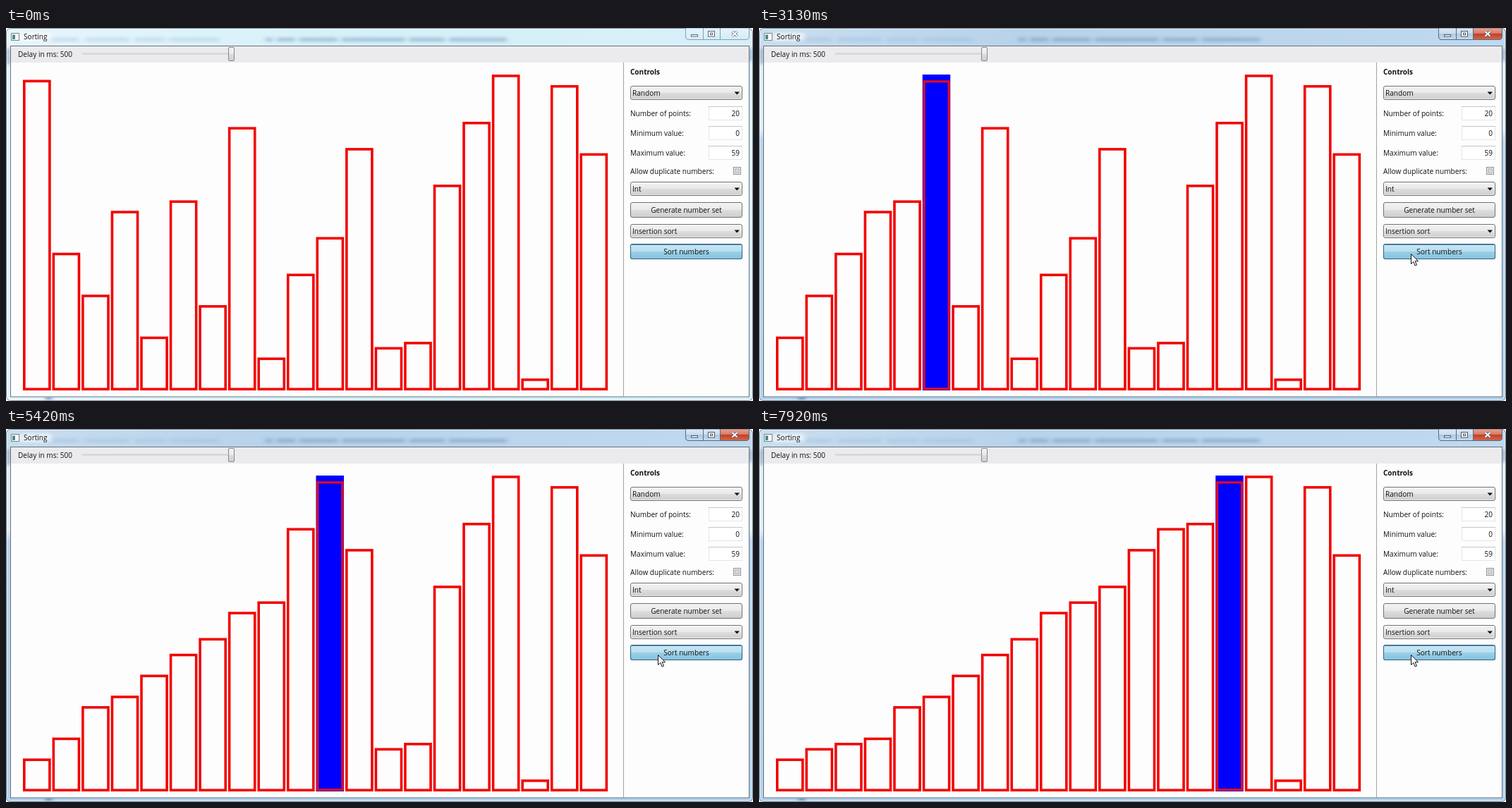
Animation, 1059 px wide and 529 px high, one loop 8000 ms. Source, as an HTML page:

```html
<!DOCTYPE html>
<html lang="en">
<head>
<meta charset="utf-8">
<title>Sorting</title>
<style>
  html, body { margin: 0; width: 100%; height: 100%; overflow: hidden; background: #fff; }
  svg { display: block; width: 1059px; height: 529px; }
  text { font: 10.1px "Open Sans", "Noto Sans", sans-serif; fill: #111; white-space: pre; }
  .bold { font-weight: bold; font-size: 10px; }
  .mid { text-anchor: middle; }
  .end { text-anchor: end; }
</style>
</head>
<body>
<svg id="stage" viewBox="0 0 1059 529"></svg>
<script>
const LOOP = 8000;
const VALUES = [58, 25, 17, 33, 9, 35, 15, 49, 5, 21, 28, 45, 7, 8, 38, 50, 59, 1, 57, 44];
const stage = document.getElementById('stage');
const get = id => document.getElementById(id);

// Markup helpers
const rect = (x, y, w, h, fill, more = '') =>
  `<rect x="${x}" y="${y}" width="${w}" height="${h}" fill="${fill}" ${more}/>`;
const path = (d, more) => `<path d="${d}" ${more}/>`;
const text = (x, y, s, cls = '') => `<text x="${x}" y="${y}" class="${cls}">${s}</text>`;
const gradient = (id, stops, dir = 'x2="0" y2="1"') =>
  `<linearGradient id="${id}" ${dir}>` +
  stops.map(([at, c]) => `<stop offset="${at}" stop-color="${c}"/>`).join('') +
  '</linearGradient>';

const box = (y, h, fill = 'url(#grey)', line = '#707070', more = '') =>
  rect(885.5, y + .5, 158, h - 1, fill, `rx="2.5" stroke="${line}" ${more}`);
const combo = (y, label) => box(y, 20) +
  rect(886.5, y + 1.5, 156, 17, 'none', 'rx="2" stroke="#fff" stroke-opacity=".6"') +
  text(888, y + 14, label) + path(`M1032.5 ${y + 8.5}h7.5l-3.75 4z`, 'fill="#111"');
const field = (y, label, value) => text(885, y + 14, label) +
  rect(996.5, y + .5, 47, 19, '#fff', 'stroke="#e2e5ea"') +
  path(`M996 ${y + .5}h48`, 'stroke="#c4c6cb"') + text(1040, y + 14, value, 'end');

const titleButtons = (fill, closeFill, line, glyph, closeGlyph) =>
  path('M963.5 0V12q0 4.5 4.5 4.5H1012.500V0z', `fill="${fill}" stroke="${line}"`) +
  path('M1012.500 0V16.500H1049q4.500 0 4.500-4.500V0z', `fill="${closeFill}" stroke="${line}"`) +
  path('M988.500 0V16', `stroke="${line}"`) +
  rect(971.5, 9.5, 9, 2.5, '#fff', `stroke="${glyph}"`) +
  rect(995.5, 4.5, 9, 7.500, '#fff', `stroke="${glyph}"`) +
  rect(998.5, 7, 3, 2.500, 'none', `stroke="${glyph}"`) +
  path('M1029.500 5l7 6.500m0-6.500l-7 6.500', `stroke="${glyph}" stroke-width="3.600"`) +
  path('M1029.500 5l7 6.500m0-6.500l-7 6.500', `stroke="${closeGlyph}" stroke-width="2"`);

const blurs = [[58, 45], [112, 62], [182, 44], [232, 70], [368, 10], [384, 26], [416, 54],
  [476, 90], [572, 50], [628, 82]]
  .map(([x, w]) => rect(x, 14, w, 5, x > 360 ? '#5f7fa6' : '#86a9d0',
    `opacity="${x > 360 ? .42 : .3}"`)).join('');

stage.innerHTML = `<defs>
  ${gradient('grey', [[0, '#f3f3f3'], [.5, '#e9e9e9'], [.5, '#dddddd'], [1, '#cecece']])}
  ${gradient('hot', [[0, '#e8f6fd'], [.5, '#d8effb'], [.5, '#c1e5f8'], [1, '#aedcf4']])}
  ${gradient('down', [[0, '#cbe7f5'], [.5, '#b7dff0'], [.5, '#9bcfe6'], [1, '#86c2de']])}
  ${gradient('red', [[0, '#e8a697'], [.48, '#d77663'], [.5, '#c0402a'], [1, '#d4694a']])}
  ${gradient('glass', [[0, '#dcebf8'], [.48, '#c8dcee'], [.5, '#adc8e0'], [1, '#c4dcf0']])}
  ${gradient('pale', [[0, '#e4f5fd'], [1, '#d3ecf7']])}
  ${gradient('idle', [[0, '#e6f5fd'], [.5, '#d4f0f8'], [1, '#d8effa']], '')}
  ${gradient('active', [[0, '#c9deef'], [.35, '#b7d2ea'], [1, '#bfd9f0']], '')}
  ${gradient('side', [[0, '#b9d2ea'], [.1, '#e2eef7'], [.27, '#e2eef7'], [.3, '#b9d4ee'], [1, '#b5d2ee']])}
  <filter id="blur"><feGaussianBlur stdDeviation="3 2"/></filter>
  <clipPath id="frame">${rect(0, 0, 1059, 529, '#000', 'rx="6"')}</clipPath>
</defs>
<g clip-path="url(#frame)">
  ${rect(0, 0, 1059, 529, 'url(#idle)')}
  <g id="focus">
    ${rect(0, 0, 1059, 529, 'url(#side)')}
    ${rect(0, 0, 1059, 26, 'url(#active)')}
  </g>
  <g filter="url(#blur)">${blurs}
    ${rect(0, 29, 5, 22, '#506a88', 'opacity=".6"')}
    ${rect(1055, 29, 4, 18, '#405a90', 'opacity=".7"')}
    ${rect(56, 524, 9, 4, '#305a90', 'opacity=".8"')}
    ${rect(20, 7, 44, 11, '#fff', 'opacity=".7"')}
  </g>
  ${rect(.5, .5, 1058, 528, 'none', 'rx="6" stroke="#53616d" stroke-opacity=".75"')}
  ${rect(1.5, 1.5, 1056, 526, 'none', 'rx="5" stroke="#fff" stroke-opacity=".55"')}
</g>
${rect(7.5, 7.5, 11, 10, '#fff', 'stroke="#77838d"')}
${rect(9, 9.500, 4, 6.500, '#4b8d88')}
${text(25, 16, 'Sorting')}
${titleButtons('url(#pale)', 'url(#pale)', '#8b9daa', '#5b6670', '#fff')}
<g id="buttons">${titleButtons('url(#glass)', 'url(#red)', '#5a6b7c', '#4c5866', '#fff')}</g>

${rect(6.5, 25.5, 1047, 497.500, '#fdfdfd', 'stroke="#66727d"')}
${rect(7, 26, 1046, 23, '#ebebee')}
${text(17, 41, 'Delay in ms: 500')}
${rect(108, 35.500, 208, 2, '#d0d1d4')}
${rect(315.500, 27.500, 8, 19, 'url(#grey)', 'rx="1.5" stroke="#85878a"')}
${path('M875.500 49V523', 'stroke="#a2a2a4"')}

${text(885, 65.500, 'Controls', 'bold')}
${combo(82, 'Random')}
${field(111, 'Number of points:', 20)}
${field(139, 'Minimum value:', 0)}
${field(167, 'Maximum value:', 59)}
${text(885, 207, 'Allow duplicate numbers:')}
${rect(1031.500, 197.500, 10, 10, '#f4f4f4', 'stroke="#8e8f8f"')}
${rect(1033.500, 199.500, 6, 6, '#d3d5d8', 'stroke="#b4b8bd"')}
${combo(218, 'Int')}
${box(247, 22)}${text(964.500, 262, 'Generate number set', 'mid')}
${combo(278, 'Insertion sort')}
${box(306, 22)}
<g id="hot">${box(306, 22, 'url(#hot)', '#3a93b5')}
  ${rect(886.500, 307.500, 156, 19, 'none', 'rx="2" stroke="#62cdee"')}</g>
<g id="down">${box(306, 22, 'url(#down)', '#2c628b')}
  ${path('M887 307.500H1042', 'stroke="#5c8dab"')}</g>
${text(964.500, 321, 'Sort numbers', 'mid')}

${rect(0, 66, 39.500, 448, '#00f', 'id="marker"')}
<g id="bars" fill="none">${VALUES.map(() => '<rect/>').join('')}</g>
${path('M0 0V14l3.300-3 2.400 5.500 2.300-1-2.400-5.300H10z',
  'id="cursor" fill="#fff" stroke="#111" stroke-linejoin="round"')}`;

const bars = [...get('bars').children];
const marker = get('marker');
const ramp = (t, from, to) => Math.min(1, Math.max(0, (t - from) / (to - from)));
const barX = i => 24 + 41.55 * i;

// Index of the most recently inserted number; 0 before sorting begins
function sortedTo(t) {
  if (t < 880) return 0;
  return t < 3420 ? Math.min(5, 1 + Math.floor((t - 880) / 500))
                  : 6 + Math.floor((t - 3420) / 500);
}

function drawBars(t) {
  const last = sortedTo(t);
  const head = VALUES.slice(0, last + 1).sort((a, b) => a - b);
  const list = head.concat(VALUES.slice(last + 1));
  marker.setAttribute('visibility', last ? 'visible' : 'hidden');
  marker.setAttribute('x', barX(last));
  list.forEach((v, i) => {
    const lit = last > 0 && i === last;
    const inset = lit ? 2.3 : 1.8;
    const top = 511.9 - 7.43 * (v + 1);
    const attrs = {
      x: barX(i) + inset, y: top + inset,
      width: 39.7 - 2 * inset, height: 514 - top - 2 * inset,
      stroke: lit ? '#e40a1c' : '#f20303', 'stroke-width': lit ? 3.2 : 3.6
    };
    for (const k in attrs) bars[i].setAttribute(k, attrs[k]);
  });
}

function draw(t) {
  drawBars(t);
  const active = ramp(t, 680, 840);
  get('focus').setAttribute('opacity', active);
  get('buttons').setAttribute('opacity', active);
  get('hot').setAttribute('opacity', ramp(t, 500, 680));
  get('down').setAttribute('opacity', ramp(t, 720, 800) * (1 - ramp(t, 880, 1120)));

  const left = (1 - ramp(t, 30, 640)) ** 2;
  const x = 926 + 74 * left - 2 * ramp(t, 1000, 1300);
  get('cursor').setAttribute('transform', `translate(${x + .5} ${320.5 + 215 * left})`);
}

const start = performance.now();
function tick() {
  draw((performance.now() - start) % LOOP);
  requestAnimationFrame(tick);
}
tick();
</script>
</body>
</html>
```
